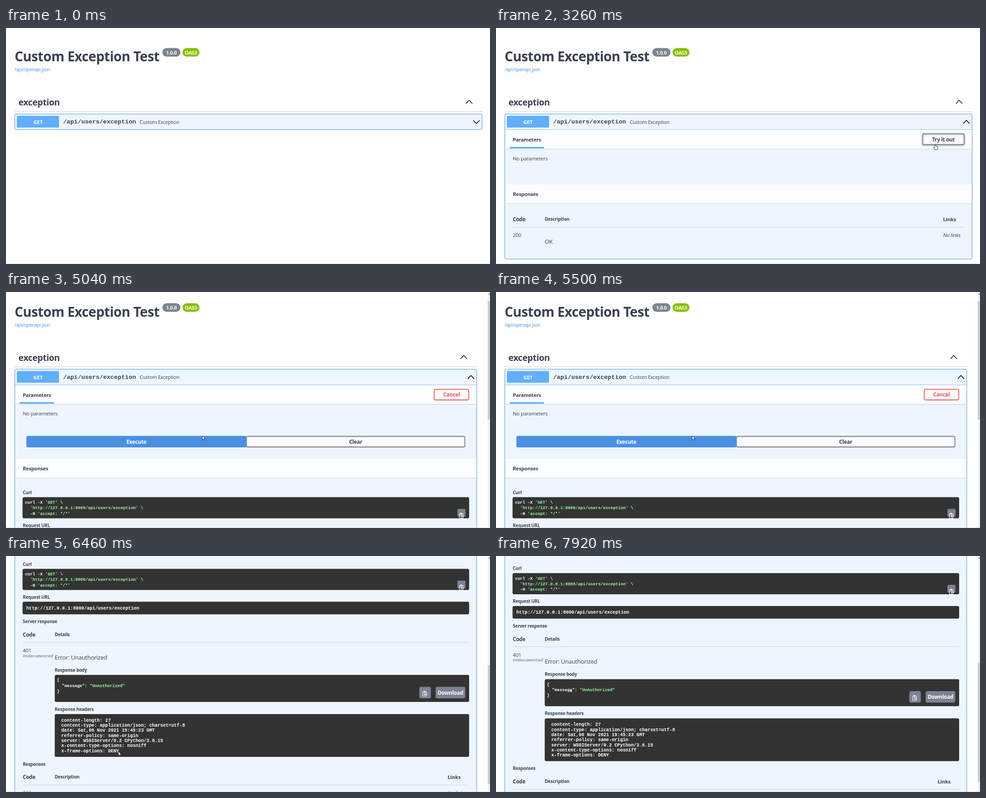
Animation of 1068x524 px, one loop 7990 ms. Source, as an HTML page with a canvas:

```html
<!DOCTYPE html>
<html lang="en">
<head>
<meta charset="utf-8">
<title>Custom Exception Test</title>
<style>
html, body { margin: 0; width: 100%; height: 100%; overflow: hidden; background: #fefefe; }
canvas { display: block; }
</style>
</head>
<body>
<canvas id="stage" width="1068" height="524"></canvas>
<script>
const ctx = document.getElementById('stage').getContext('2d');
const W = 1068, H = 524, LOOP = 7990, FIRST_MOVE = 310, STEP = 68.56;
const SANS = '"Open Sans", "Noto Sans", sans-serif';
const MONO = '"Liberation Mono", "DejaVu Sans Mono", monospace';
const INK = '#3b4151', BLUE = '#61affe', EXEC = '#4990e2', DARK = '#333', GREY = '#7d8293', GREEN = '#a2fca2';
const COLLAPSED = 0, EXPANDED = 1, TRYING = 2, EXECUTED = 3;

// Tracks: time, then values
const POINTER = [
  [310, 1010, 516], [1060, 720, 344], [1400, 623, 205], [1850, 623, 205], [2160, 540, 285],
  [2630, 868, 319], [3080, 969, 258], [3480, 969, 258], [4012, 585, 263], [4360, 560, 298],
  [4850, 433, 319], [5520, 433, 319], [6206, 263, 451], [6480, 248, 434], [6750, 188, 374],
  [7250, 134, 330], [7640, 163, 294]
];
const SCROLL = [[3920, 0], [4070, 19.5], [5820, 19.5], [6450, 446.5], [7790, 446.5], [7920, 437]];

function sample(track, t) {
  if (t <= track[0][0]) return track[0].slice(1);
  for (let i = 1; i < track.length; i++) {
    const [a, b] = [track[i - 1], track[i]];
    if (t < b[0]) {
      const k = (t - a[0]) / (b[0] - a[0]);
      return a.slice(1).map((v, j) => v + (b[j + 1] - v) * k);
    }
  }
  return track[track.length - 1].slice(1);
}

function text(str, x, y, size, { color = INK, style = '', family = SANS, align = 'left' } = {}) {
  ctx.font = `${style} ${size}px ${family}`;
  ctx.letterSpacing = family === SANS ? `${-0.02 * size}px` : '0px';
  ctx.textAlign = align;
  ctx.fillStyle = color;
  ctx.fillText(str, x, y);
}
const bold = (str, x, y, size, color = INK, align = 'left') =>
  text(str, x, y, size, { style: 'bold', color, align });
const mono = (str, x, y, size, color = '#fff') =>
  text(str, x, y, size, { style: 'bold', family: MONO, color });

function box(x1, y1, x2, y2, r, fill, stroke, width = 1) {
  ctx.beginPath();
  ctx.roundRect(x1, y1, x2 - x1, y2 - y1, r);
  if (fill) { ctx.fillStyle = fill; ctx.fill(); }
  if (stroke) { ctx.strokeStyle = stroke; ctx.lineWidth = width; ctx.stroke(); }
}

function polyline(points, color, width) {
  ctx.beginPath();
  points.forEach(([x, y]) => ctx.lineTo(x, y));
  ctx.strokeStyle = color;
  ctx.lineWidth = width;
  ctx.stroke();
}

function rule(x1, x2, y, color) {
  ctx.fillStyle = color;
  ctx.fillRect(x1, y - .5, x2 - x1, 1);
}

function shadow(color, blur, dy) {
  ctx.shadowColor = color;
  ctx.shadowBlur = blur;
  ctx.shadowOffsetY = dy;
}
const noShadow = () => shadow('transparent', 0, 0);

const chevron = (x, y, dir) =>
  polyline([[x - 7, y + 3.7 * dir], [x, y - 3.7 * dir], [x + 7, y + 3.7 * dir]], '#111', 1.6);

function button(label, x1, y1, x2, y2, color, ink = color, strong = false) {
  shadow(`rgba(0,0,0,${strong ? .3 : .1})`, strong ? 4 : 2, 1);
  box(x1 + 1, y1 + 1, x2 - 1, y2 - 1, 3, '#f9fbfe', color, 1.8);
  noShadow();
  bold(label, (x1 + x2) / 2, (y1 + y2) / 2 + 4.5, 11.6, ink, 'center');
}

function solidButton(label, x1, y1, x2, y2, fill, r = 3) {
  box(x1, y1, x2, y2, r, fill);
  bold(label, (x1 + x2) / 2, (y1 + y2) / 2 + 4.3, 11.7, '#fff', 'center');
}

function clipboard(x, y) {
  ctx.save();
  ctx.translate(x, y);
  ctx.strokeStyle = '#fff';
  ctx.lineWidth = 1;
  ctx.strokeRect(-4.5, -4, 8, 9.5);
  ctx.fillStyle = '#fff';
  ctx.fillRect(-2.5, -6, 4, 3);
  polyline([[-3, -1], [2, -1]], '#fff', 1);
  polyline([[6, 2], [-1, 2], [1, 0], [-1, 2], [1, 4]], '#fff', 1);
  ctx.restore();
}

function band(title, y, right) {
  shadow('rgba(0,0,0,.12)', 2, 1);
  ctx.fillStyle = '#fcfdfe';
  ctx.fillRect(20.5, y, right - 21.5, 42);
  noShadow();
  bold(title, 37, y + 26, 11.1);
}

function responseTable(dy, right) {
  bold('Code', 37, 429 + dy, 11.6);
  bold('Description', 107.5, 428 + dy, 9.9);
  bold('Links', right - 64.5, 429 + dy, 11.2);
  rule(37, right - 17, 442.5 + dy, '#cdd5df');
  text('200', 37, 464 + dy, 11.4);
  text('OK', 107.5, 479 + dy, 13);
  text('No links', right - 64.5, 464 + dy, 11.5, { style: 'italic' });
}

function executedDetails() {
  bold('Curl', 37, 468, 9.9);
  box(36.5, 475, 1022, 522, 3.5, DARK);
  const charW = 5.55, codeSize = 9.25;
  const curl = [
    ['curl -X ', "'GET'", ' \\'],
    ['  ', "'http://127.0.0.1:8000/api/users/exception'", ' \\'],
    ['  -H ', "'accept: */*'", '']
  ];
  curl.forEach(([before, quoted, after], i) => {
    const y = 489.6 + 12.3 * i;
    mono(before, 42, y, codeSize);
    mono(quoted, 42 + before.length * charW, y, codeSize, GREEN);
    mono(after, 42 + (before + quoted).length * charW, y, codeSize);
  });
  box(996, 501, 1014, 518.5, 3, GREY);
  clipboard(1005, 516);

  bold('Request URL', 37, 541, 9.9);
  box(36.5, 548, 1022, 576, 3.5, DARK);
  mono('http://127.0.0.1:8000/api/users/exception', 45, 565, 10.12);

  bold('Server response', 37, 595.5, 9.9);
  bold('Code', 37, 625.5, 11.6);
  bold('Details', 107.5, 624.5, 9.9);
  rule(37, 1022, 638.5, '#cdd5df');
  text('401', 37, 660.5, 11.4);
  text('Undocumented', 37, 671, 9.3, { style: 'italic bold', family: MONO, color: '#888e98' });
  text('Error: Unauthorized', 107.5, 676, 13);

  bold('Response body', 107.5, 703, 9.9);
  box(107.5, 710.5, 1022, 770.5, 3.5, DARK);
  mono('{', 112.5, 724.8, codeSize);
  mono('  "message": ', 112.5, 737.1, codeSize);
  mono('"UnAuthorized"', 112.5 + 13 * charW, 737.1, codeSize, GREEN);
  mono('}', 112.5, 749.4, codeSize);
  box(912, 737, 937.5, 762.5, 3.5, GREY);
  clipboard(924, 752);
  solidButton('Download', 948, 737, 1013.5, 762.5, GREY, 3.5);

  bold('Response headers', 107.5, 790, 9.9);
  box(107.5, 797.5, 1022, 892.5, 3.5, DARK);
  [
    'content-length: 27',
    'content-type: application/json; charset=utf-8',
    'date: Sat,06 Nov 2021 19:45:23 GMT',
    'referrer-policy: same-origin',
    'server: WSGIServer/0.2 CPython/3.6.15',
    'x-content-type-options: nosniff',
    'x-frame-options: DENY'
  ].forEach((line, i) => mono(line, 122, 814.3 + 11.3 * i, 10.12));
  bold('Responses', 37, 912, 9.9);
}

function drawPage(mode, hovering) {
  const right = mode >= TRYING ? 1039 : 1051;
  const bodyShift = [0, 0, 30.5, 42.5][mode];
  const tableShift = mode === EXECUTED ? 512.5 : bodyShift;
  const open = mode !== COLLAPSED;

  bold('Custom Exception Test', 19, 74, 29.5);
  box(345, 44.5, 385, 63.5, 9.5, '#7d8492');
  bold('1.0.0', 365, 58.6, 10.8, '#fff', 'center');
  box(389.5, 44.5, 427, 63.5, 9.5, '#89bf04');
  bold('OAS3', 408, 58.6, 10.8, '#fff', 'center');
  text('/api/openapi.json', 19, 96, 10.05, { color: EXEC });

  bold('exception', 27.5, 172, 19.4);
  chevron(right - 29, 164, 1);
  rule(19, right, 185.5, '#cfd1d6');

  shadow('rgba(0,0,0,.15)', 3, 0);
  box(19.5, 191, right - .5, open ? 513 + tableShift : 225.5, 3.5, '#edf6fe', BLUE);
  noShadow();
  box(24, 195, 117, 221, 2.5, BLUE);
  bold('GET', 70.5, 213, 11.4, '#fff', 'center');
  mono('/api/users/exception', 126, 212, 13.4, INK);
  text('Custom Exception', 295, 212.7, 10.85);
  chevron(right - 13, 208.7, open ? 1 : -1);
  if (!open) return;

  band('Parameters', 226, right);
  rule(20, right - 1, 225.5, '#8fc4f7');
  ctx.fillStyle = BLUE;
  ctx.fillRect(30, 264, 76, 3.5);
  if (mode === EXPANDED) button('Try it out', 940.5, 234, 1034, 260, '#808288', INK, hovering);
  else button('Cancel', 944, 234.3, 1022, 260, '#ff6060', '#ec5555');
  text('No parameters', 37, 293.5, 11.4);

  if (mode === TRYING) solidButton('Execute', 36.5, 330, 1022, 360.5, EXEC);
  if (mode === EXECUTED) {
    button('Clear', 529.5, 339, 1013.5, 364.5, '#808288', INK);
    solidButton('Execute', 45, 339, 530.5, 364.5, EXEC);
  }
  band('Responses', 347 + bodyShift, right);
  if (mode === EXECUTED) executedDetails();
  responseTable(tableShift, right);
}

function drawScrollbar(mode, scroll) {
  ctx.fillStyle = '#f1f1f1';
  ctx.fillRect(1063, 0, 5, H);
  const [top, length] = mode === EXECUTED ? [10 + .522 * scroll, 263] : [10.5 + scroll, H];
  ctx.fillStyle = '#cdcdcd';
  ctx.fillRect(1063, top, 5, length);
  polyline([[1065.5, 6], [1068.5, 3]], '#505050', 1.5);
}

const ARROW = new Path2D('M0 0V9.2L2.1 7.2L3.6 10.2L5 9.6L3.6 6.7L6.6 6.5Z');
const HAND = new Path2D('M-1 .5Q0-.8 1 .5V4Q2 3.3 2.7 4.3Q4 3.7 4.4 4.8Q5.7 4.5 5.8 5.8V8.5L4.8 12H-.8L-3.6 8Q-3.8 6.3-2.2 6.6L-1 7.8Z');

function drawPointer(x, y, hand) {
  ctx.save();
  ctx.translate(x, y);
  ctx.fillStyle = '#fff';
  ctx.strokeStyle = '#222';
  ctx.lineWidth = .9;
  ctx.fill(hand ? HAND : ARROW);
  ctx.stroke(hand ? HAND : ARROW);
  ctx.restore();
}

function draw(now) {
  const tick = Math.floor((now % LOOP - FIRST_MOVE + 24) / STEP);
  const t = tick < 0 ? 0 : FIRST_MOVE + tick * STEP;
  const mode = t < 1600 ? COLLAPSED : t < 3380 ? EXPANDED : t < 4950 ? TRYING : EXECUTED;
  const [scroll] = sample(SCROLL, t);
  const [x, y] = sample(POINTER, t);
  const onTry = mode === EXPANDED && x > 940 && y < 260;
  const hand = y < 226 || onTry || (mode === TRYING && y > 311);

  ctx.fillStyle = '#fefefe';
  ctx.fillRect(0, 0, W, H);
  ctx.save();
  ctx.translate(0, -scroll);
  drawPage(mode, onTry);
  ctx.restore();
  if (mode >= TRYING) drawScrollbar(mode, scroll);
  rule(0, W, 523.5, '#d9dce2');
  if (tick >= 0) drawPointer(x, y, hand);
  requestAnimationFrame(loop);
}

let start;
function loop(now) {
  start ??= now;
  draw(now - start);
}
requestAnimationFrame(loop);
</script>
</body>
</html>
```
